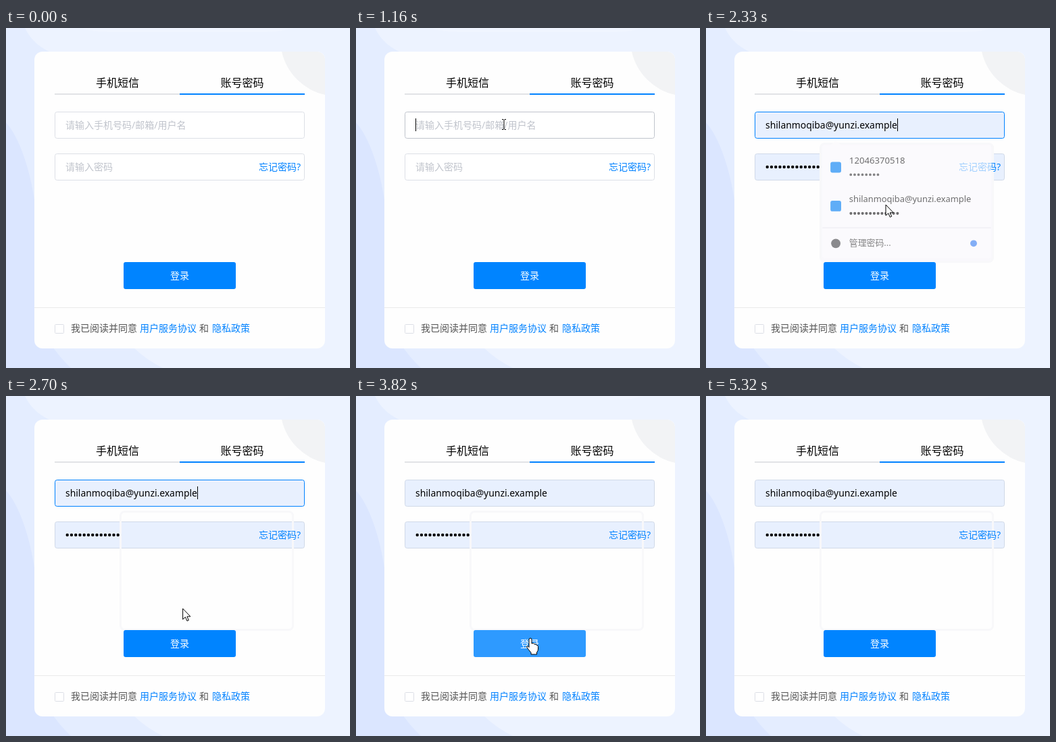
These frames come from a looping animation (509 by 504 pixels, 6780 ms). An HTML page:

```html
<!DOCTYPE html>
<html lang="zh-CN">
<head>
<meta charset="utf-8">
<title>登录</title>
<style>
  html, body { margin: 0; width: 100%; height: 100%; overflow: hidden; background: #edf3ff; }
  svg { display: block; font: 14px "Noto Sans", "Noto Sans CJK SC", sans-serif; }
  .link { fill: #0082ff; }
  .hint { fill: #c0c4cc; }
  .preview { font: 13px "Liberation Sans", Arial, sans-serif; }
  .dots { fill: none; stroke: #000; stroke-linecap: round; }
  .cursor { fill: #fff; stroke: #000; stroke-linejoin: round; }
</style>
</head>
<body>
<svg width="509" height="504" viewBox="0 0 509 504">
  <defs>
    <clipPath id="cardClip"><rect x="42" y="35" width="430" height="440" rx="12"/></clipPath>
    <filter id="shadow" x="-10%" y="-10%" width="120%" height="120%">
      <feDropShadow dx="0" dy="1" stdDeviation="1.5" flood-opacity=".32"/>
    </filter>
  </defs>

  <!-- Backdrop and card -->
  <path d="M0 0H28C38 20 50 28 66 36L190 475Q208 492 232 504H0Z" fill="#e4edff"/>
  <path d="M0 140C22 165 36 215 42 255V420Q60 470 96 504H0Z" fill="#dbe6ff"/>
  <path d="M110 0H425Q405 6 385 6H150Q125 5 110 0Z" fill="#f0f5ff"/>
  <g clip-path="url(#cardClip)">
    <rect x="42" y="35" width="430" height="440" fill="#fefefe"/>
    <path d="M408 35A84 84 0 0 0 472 99V35Z" fill="#f2f3f5"/>
    <path d="M42 414.5H472" stroke="#ebebeb"/>
  </g>

  <g font-size="16">
    <text x="133" y="87">手机短信</text>
    <text x="317.5" y="87">账号密码</text>
  </g>
  <path d="M72 98H257" stroke="#e1e3e6" stroke-width="2"/>
  <path d="M257 98H442" stroke="#0082ff" stroke-width="2"/>

  <!-- Fields -->
  <rect id="userBox" x="72.5" y="124.5" width="369" height="39" rx="3"/>
  <rect id="passBox" x="72.5" y="186.5" width="369" height="39" rx="3"/>
  <g id="hints" class="hint">
    <text x="88" y="149">请输入手机号码/邮箱/用户名</text>
    <text x="88" y="211">请输入密码</text>
  </g>
  <text id="userText" x="88" y="149"></text>
  <path id="passDots" class="dots"/>
  <path id="caret" d="M88.5 134V153" stroke="#000"/>

  <rect id="trace" x="169.5" y="171.5" width="255" height="175" rx="6" fill="#f9f8fc" stroke="#f8f8fa" stroke-width="3"/>
  <text class="link" x="374" y="211">忘记密码?</text>

  <!-- Button and agreement -->
  <rect x="174" y="347" width="166" height="40" rx="3" fill="#0084ff"/>
  <rect id="tint" x="174" y="347" width="166" height="40" rx="3"/>
  <text x="257" y="372" fill="#fff" text-anchor="middle">登录</text>
  <rect x="72.5" y="439.5" width="13" height="13" rx="1" fill="#fff" stroke="#dcdfe6"/>
  <g fill="#555">
    <text x="96" y="450">我已阅读并同意</text>
    <text x="286" y="450">和</text>
  </g>
  <text class="link" x="198" y="450">用户服务协议</text>
  <text class="link" x="305" y="450">隐私政策</text>

  <!-- Saved logins -->
  <g id="popup">
    <g id="panel">
      <path d="M175 173H183L191 166L199 173H419Q423 173 423 177V338Q423 342 419 342H175Q171 342 171 338V177Q171 173 175 173Z" fill="#fdfcfe"/>
    </g>
    <rect id="rowHover" x="171" width="252" fill="#f0eef0"/>
    <path d="M171 296.5H423" stroke="#e2e0ec"/>
    <g fill="#0a84f5">
      <rect x="183" y="198" width="16" height="16" rx="3"/>
      <rect x="183" y="256" width="16" height="16" rx="3"/>
    </g>
    <circle cx="191" cy="320" r="7" fill="#4d4d50"/>
    <circle cx="397" cy="320" r="5" fill="#4285f4"/>
    <g fill="#222" font-size="13">
      <text id="phoneRow" x="211" y="200" font-size="13.3"></text>
      <text id="mailRow" x="211" y="258"></text>
      <text x="211" y="324" fill="#444">管理密码...</text>
    </g>
    <path id="phoneDots" class="dots" style="stroke:#444"/>
    <path id="mailDots" class="dots" style="stroke:#222"/>
  </g>

  <!-- Pointer shapes -->
  <g id="pointer" class="cursor">
    <path id="arrow" d="M0 0V16L3.8 12.6L6.3 18.3L8.7 17.3L6.3 11.8H11.3Z"/>
    <path id="hand" d="M-2 2Q-2 0 0 0T2 2V8Q5 6.5 6 9Q9 8 9.3 10.5Q11.5 10 11.5 12.5V16Q11.5 19 9.5 21V24H1V21.5L-5 14Q-6 11.5-4 11.5L-2 13.5Z"/>
    <path id="beam" fill="none" d="M-3 -7.5H-1L0 -6.5L1 -7.5H3M-3 7.5H-1L0 6.5L1 7.5H3M0 -6.5V6.5"/>
  </g>
</svg>

<script>
const LOOP = 6780;
const MAIL = 'shilanmoqiba@yunzi.example';
const PHONE = '12046370518';
const $ = id => document.getElementById(id);
const set = (id, attrs) => {
  for (const name in attrs) $(id).setAttribute(name, attrs[name]);
};
const show = (id, on) => { $(id).style.display = on ? '' : 'none'; };
const within = (v, from, to) => v >= from && v < to;
const smooth = k => k * k * (3 - 2 * k);
const linear = k => k;

// Each track is a list of [time, ...values].
const pointerTrack = [
  [370, 285, 468], [1010, 219, 143], [1240, 219, 143], [1700, 266, 262],
  [2420, 266, 262], [2890, 258, 359], [4960, 258, 359], [5330, 346, 508]
];
const tintTrack = [
  [580, 0], [640, .2], [670, .2], [750, 0], [2780, 0], [2880, .2], [3540, .2],
  [3600, -.1], [3660, -.1], [3780, .18], [4980, .18], [5120, 0]
];
const popupTrack = [[1240, 0], [1360, 1], [2230, 1], [2330, .64], [2390, .6], [2480, 0]];
const traceTrack = [[2390, 1], [2480, 0]];
const focusTrack = [[1230, 0], [1400, 1], [3550, 1], [3750, 0]];

function sample(track, t, ease = linear) {
  if (t <= track[0][0]) return track[0].slice(1);
  const i = track.findIndex(key => key[0] > t);
  if (i < 0) return track[track.length - 1].slice(1);
  const [t0, ...a] = track[i - 1], [t1, ...b] = track[i];
  const k = ease((t - t0) / (t1 - t0));
  return a.map((v, n) => v + (b[n] - v) * k);
}

function mix(a, b, k) {
  return `rgb(${a.map((v, n) => Math.round(v + (b[n] - v) * k))})`;
}

function drawDots(id, x, y, count, pitch, size) {
  set(id, {
    d: count ? `M${x + size / 2} ${y}h${(count - 1) * pitch + .1}` : '',
    'stroke-width': size,
    'stroke-dasharray': `0 ${pitch}`
  });
}

function drawFields(t, x, y, row) {
  const accepted = t >= 2230;
  const filled = accepted || row > 0;
  const inside = top => t >= 370 && t < 1300 && within(x, 72, 442) && within(y, top, top + 40);
  const rest = top => inside(top) ? [192, 196, 204] : filled ? [208, 217, 232] : [220, 223, 230];
  const fill = filled ? '#e8f0fe' : '#fff';

  set('userBox', { fill, stroke: mix(rest(124), [0, 130, 255], sample(focusTrack, t)[0]) });
  set('passBox', { fill, stroke: mix(rest(186), [0, 0, 0], 0) });
  show('hints', !filled);

  $('userText').textContent = !filled ? '' : row === 1 ? PHONE : MAIL;
  set('userText', { class: accepted ? '' : 'preview', 'font-size': 13.9 });
  const count = !filled ? 0 : row === 1 ? 8 : 13;
  if (accepted) drawDots('passDots', 88.5, 206, count, 6.25, 4.4);
  else drawDots('passDots', 88, 206, count, 4.75, 3.8);

  const blinkOn = within(t, 2280, 2850) || within(t, 3380, 3570);
  show('caret', blinkOn || (within(t, 1110, 1640) && !filled));
  set('caret', { transform: `translate(${accepted ? 195 : 0})` });
}

function drawPopup(t, row) {
  const [opacity] = sample(popupTrack, t);
  const scale = t > 2230 ? 1 - (1 - opacity) * .028 : 1;
  show('popup', opacity > 0);
  set('popup', {
    opacity,
    transform: `translate(297 258) scale(${scale}) translate(-297 -258)`
  });
  set('panel', { filter: t < 2280 ? 'url(#shadow)' : 'none' });
  show('rowHover', row > 0);
  set('rowHover', row === 1 ? { y: 177, height: 58 } : { y: 235, height: 58 });

  // A faint outline of the panel stays behind.
  show('trace', t >= 2280);
  set('trace', { 'fill-opacity': sample(traceTrack, t)[0] });
}

function drawPointer(t, x, y) {
  const overButton = within(x, 174, 340) && within(y, 347, 387);
  const overField = t < 1400 && (within(y, 124, 164) || within(y, 186, 226));
  const shape = overButton ? 'hand' : overField ? 'beam' : 'arrow';
  for (const id of ['arrow', 'hand', 'beam']) show(id, id === shape);
  show('pointer', within(t, 370, 5320));
  set('pointer', { transform: `translate(${x.toFixed(1)} ${y.toFixed(1)})` });
}

function draw(t) {
  // The pointer is refreshed every 50 ms.
  const [x, y] = sample(pointerTrack, t - (t + 30) % 50, smooth);
  const open = within(t, 1340, 2230);
  const row = !open ? 0 : within(y, 173, 235) ? 1 : within(y, 235, 297) ? 2 : 0;
  const [tint] = sample(tintTrack, t);

  drawFields(t, x, y, row);
  drawPopup(t, row);
  set('tint', { fill: tint < 0 ? '#000' : '#fff', opacity: Math.abs(tint) });
  drawPointer(t, x, y);
}

$('phoneRow').textContent = PHONE;
$('mailRow').textContent = MAIL;
drawDots('phoneDots', 211.5, 217, 8, 5.8, 3.8);
drawDots('mailDots', 211.5, 275, 13, 5.8, 4.2);

const start = performance.now();
function tick() {
  draw((performance.now() - start) % LOOP);
  requestAnimationFrame(tick);
}
tick();
</script>
</body>
</html>
```
